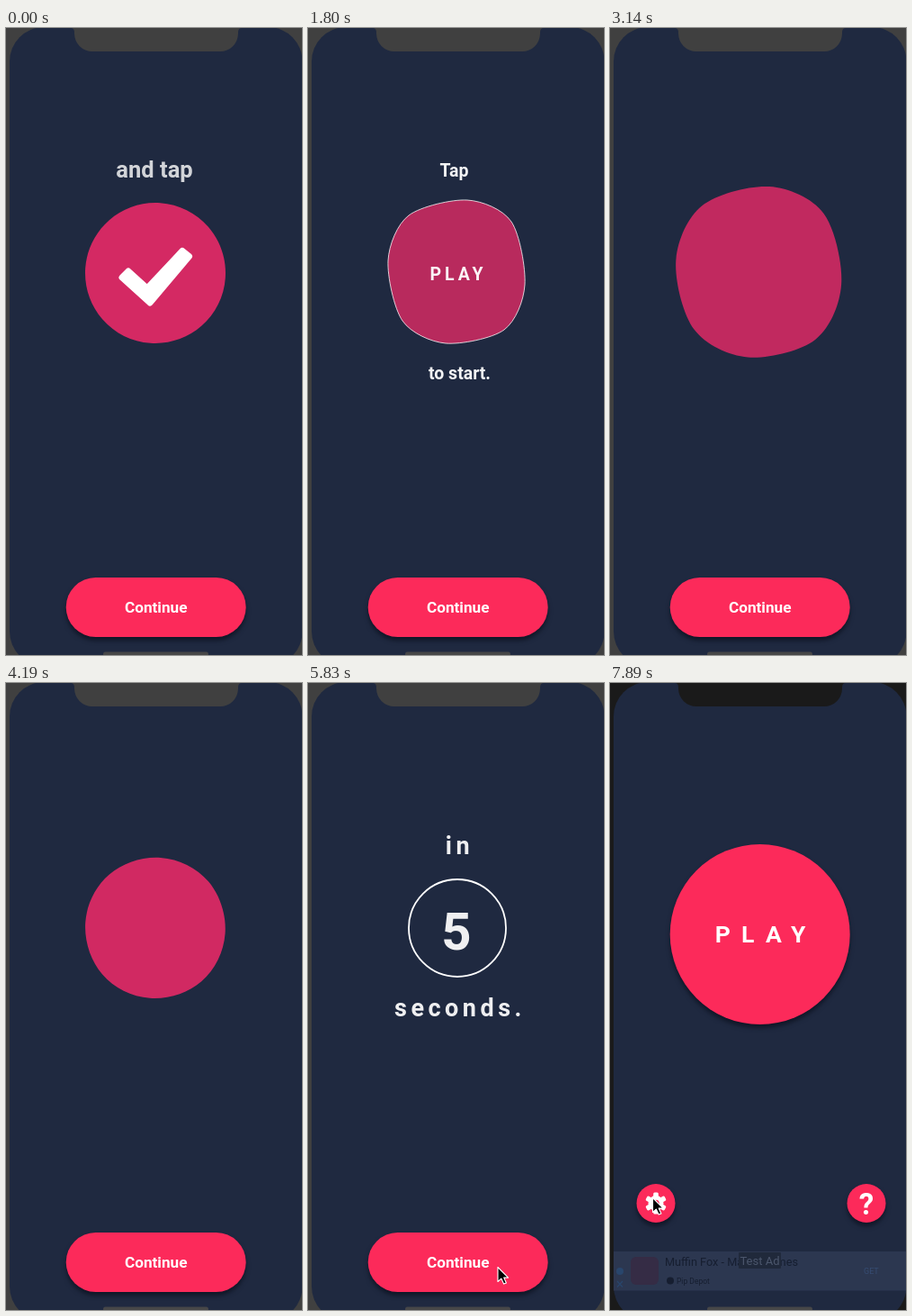
Write an HTML page that moves like this. It is 329 px wide and 696 px high and loops after 8000 ms.

```html
<!DOCTYPE html>
<html lang="en">
<head>
<meta charset="utf-8">
<title>Tutorial to home screen</title>
<style>
  html, body { margin: 0; width: 100%; height: 100%; overflow: hidden; background: #404040; }
  svg { display: block; width: 329px; height: 696px; }
  text { font-family: Roboto, Arial, sans-serif; font-weight: 700; fill: #fff; }
  .mid { text-anchor: middle; }
  .red { fill: #fc2a5a; }
  .lift { filter: drop-shadow(0 4px 2.5px rgba(8, 12, 24, .65)); }
  .ad text { font-weight: 400; fill: #161e30; }
</style>
</head>
<body>
<svg viewBox="0 0 329 696">
  <rect id="bezel" width="329" height="696"/>
  <rect x="4" y="-1" width="325.5" height="709" rx="38" fill="#1f2940"/>
  <path id="notch" d="M72 0Q76 0 76 5V6A20 20 0 0 0 96 26H238A20 20 0 0 0 258 6V5Q258 0 262 0Z"/>
  <rect x="108" y="692.5" width="117" height="5" rx="2.5" fill="#474748"/>

  <g id="lesson">
    <path id="blob" fill="#fc2a6b"/>
    <path id="edge" fill="none" stroke="#fff"/>
    <g id="start" class="mid">
      <text x="162.5" y="165" font-size="19.5">Tap</text>
      <text x="167" y="280" font-size="19.5" letter-spacing="4">PLAY</text>
      <text x="168.5" y="390" font-size="19.5">to start.</text>
    </g>
    <text id="tap" class="mid" x="165" y="166" font-size="25.5">and tap</text>
    <path id="check" d="M129 277L136 270L157 289L196 247.5L203.5 253.5L160 305Z"
      fill="#fff" stroke="#fff" stroke-width="7" stroke-linejoin="round"/>
    <circle id="ring" cx="166" cy="272" r="54" fill="none" stroke="#fff" stroke-width="1.8"/>
    <g id="count" class="mid">
      <text x="168.5" y="190" font-size="27" letter-spacing="4.5">in</text>
      <text x="165" y="296" font-size="58">5</text>
      <text x="169" y="370" font-size="27" letter-spacing="4.5">seconds.</text>
    </g>
  </g>

  <g id="ad" class="ad">
    <rect x="4" y="631" width="325" height="43.5" fill="#2c3750"/>
    <rect x="23" y="637" width="31" height="31" rx="6" fill="#352c45"/>
    <text x="61" y="647" font-size="12.7">Muffin Fox - Match Games</text>
    <circle cx="67" cy="663.5" r="4" fill="#161e30"/>
    <text x="74" y="667" font-size="8.5">Pip Depot</text>
    <text x="282" y="656" font-size="9" style="fill:#364c72">GET</text>
    <circle cx="11" cy="653" r="4" fill="#29466c"/>
    <path d="M8 664L14 670.5M14 664L8 670.5" stroke="#29466c" stroke-width="1.2"/>
    <rect x="143" y="632" width="47" height="18" rx="1" fill="#20293b"/>
    <text class="mid" x="166.5" y="646" font-size="13" style="fill:#4b566c">Test Ad</text>
  </g>

  <g id="button">
    <rect id="pill" class="red lift" x="-100" width="200"/>
    <text id="go" class="mid" y="6" font-size="17.2">Continue</text>
    <text id="play" class="mid" x="6.5" y="9.3" font-size="26.5" letter-spacing="12.2">PLAY</text>
  </g>

  <g id="gear">
    <circle class="red lift" r="21.5"/>
    <g id="teeth" fill="#fff"></g>
    <circle r="8.5" fill="#fff"/>
    <circle class="red" r="3.8"/>
  </g>
  <g id="help">
    <circle class="red lift" r="21.5"/>
    <text class="mid" y="12" font-size="33">?</text>
  </g>

  <path id="cursor" d="M0 0V16L3.8 12.6L6.6 18.6L9.4 17.4L6.7 11.6H11.6Z"
    fill="#000" stroke="#fff" stroke-width="1.1" stroke-linejoin="round"/>
</svg>

<script>
// All timing below counts ticks; the lesson repeats every 29 of them.
const LOOP = 8000, TICK = 148.8, LESSON = 29, LESSON_START = 12;

const $ = id => document.getElementById(id);
const lerp = (a, b, k) => a + (b - a) * k;
const ramp = (t, a, b) => Math.min(1, Math.max(0, (t - a) / (b - a)));
const easeOut = (k, power) => 1 - (1 - k) ** power;
const fade = (id, v) => $(id).setAttribute('opacity', v);
const place = (id, x, y, scale = 1) =>
  $(id).setAttribute('transform', `translate(${x} ${y}) scale(${scale})`);

const squarish = [[11, -81], [60, -57], [75, 13], [52, 63], [-13, 78], [-61, 53], [-77, -14], [-54, -64]];

// Smooth closed curve between the squarish shape and a circle
function blobPath(round, scale) {
  const pts = squarish.map(([x, y], i) => {
    const a = (i * 45 - 86) * Math.PI / 180;
    return [166 + scale * lerp(x, 78 * Math.cos(a), round),
      272 + scale * lerp(y, 78 * Math.sin(a), round)];
  });
  const slack = lerp(6.8, 5.333, round);
  const at = i => pts[(i + 8) % 8];
  const handle = (i, sign) => [0, 1].map(c => at(i)[c] + sign * (at(i + 1)[c] - at(i - 1)[c]) / slack);
  return 'M' + at(0) + pts.map((_, i) => `C${handle(i, 1)} ${handle(i + 1, -1)} ${at(i + 1)}`).join('') + 'Z';
}

function drawLesson(t) {
  const round = ramp(t, 5, 17), burst = ramp(t, 20, 25);
  const swell = ramp(t, 5, 10) - ramp(t, 14, 16);
  const start = .95 * (1 - ramp(t, 4, 8));
  const tapOut = 1 - ramp(t, 20, 22);

  const d = blobPath(round, 1 + .25 * swell + .364 * burst);
  $('blob').setAttribute('d', d);
  $('edge').setAttribute('d', d);
  fade('blob', lerp(.69, .82, round) * (1 - burst) ** 1.5);
  fade('edge', start * .8);
  fade('start', start);
  fade('tap', ramp(t, 16, 17.25) * tapOut);
  fade('check', ramp(t, 16, 17) * tapOut);
  fade('ring', ramp(t, 21, 23));
  fade('count', .93 * ramp(t, 23, 25));
}

function drawScreen(t) {
  const leave = ramp(t, 43, 46);
  const grey = lerp(64, 26, leave);
  for (const id of ['bezel', 'notch']) $(id).setAttribute('fill', `rgb(${grey},${grey},${grey})`);
  fade('lesson', 1 - leave);

  const h = lerp(66, 200, leave ** 1.5);
  $('pill').setAttribute('y', -h / 2);
  $('pill').setAttribute('height', h);
  $('pill').setAttribute('rx', h / 2);
  place('button', 166.7, lerp(643, 279, easeOut(ramp(t, 43, 50), 1.61)));
  fade('go', 1 - ramp(t, 43, 45));
  fade('play', ramp(t, 44, 46));

  const pop = ramp(t, 48, 50);
  place('gear', 51, 577.5, pop);
  place('help', 285, 577.5, pop);
  fade('ad', ramp(t, 51, 53));

  const enter = easeOut(ramp(t, 36, 39), 1.6), cross = ramp(t, 47, 52);
  place('cursor', lerp(lerp(318, 211, enter), 47.5, cross), lerp(lerp(673, 648.5, enter), 571.5, cross));
  fade('cursor', t < 36 ? 0 : 1);
}

$('teeth').innerHTML = [0, 60, 120].map(a =>
  `<rect x="-2.8" y="-12" width="5.6" height="24" rx="1.5" transform="rotate(${a})"/>`).join('');

const began = performance.now();
function frame() {
  const t = Math.floor((performance.now() - began) % LOOP / TICK);
  drawLesson((t - LESSON_START + LESSON) % LESSON);
  drawScreen(t);
  requestAnimationFrame(frame);
}
frame();
</script>
</body>
</html>
```
